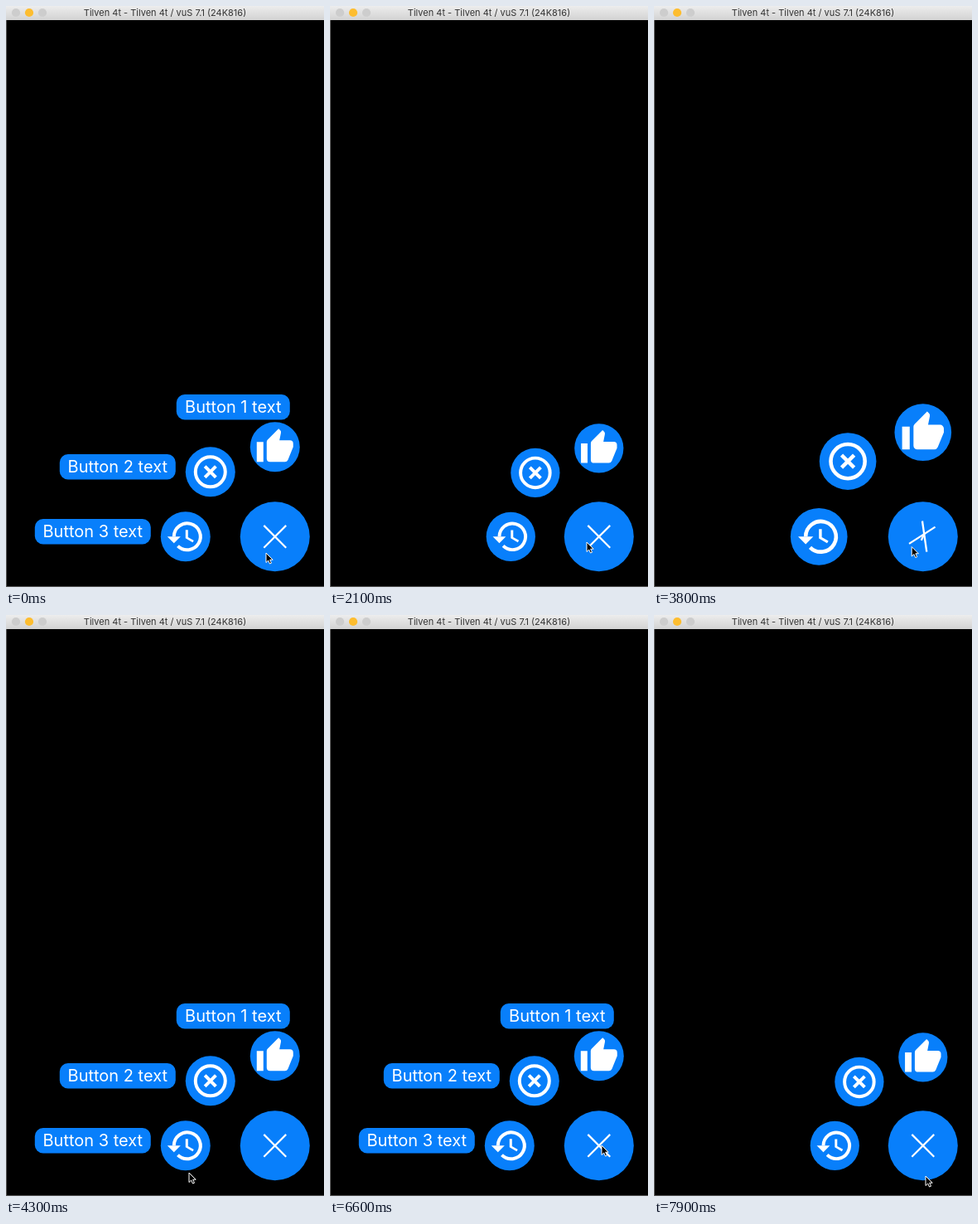
Write an HTML page with a canvas that moves like this. It is 384x700 px and loops after 8 s.

```html
<!DOCTYPE html>
<html lang="en">
<head>
<meta charset="utf-8">
<title>Floating action menu</title>
<style>
  html, body { margin: 0; height: 100%; overflow: hidden; background: #000; }
  canvas { display: block; }
</style>
</head>
<body>
<canvas id="stage" width="384" height="700"></canvas>
<script>
const ctx = document.getElementById('stage').getContext('2d');
const LOOP = 8000, BLUE = '#087ffb', GLIDE = 500;
const MAIN = { x: 324.8, y: 639.3, r: 42 };

// Icons on a 24-unit grid
const thumb = { fill: 'M1 9h4v12H1zM14.2 1l1 1q.6.6.4 1.5L14.7 8H21a2 2 0 0 1 2 2v2l-3.2 7.8A2 2 0 0 1 18 21H9a2 2 0 0 1-2-2V9q0-.8.6-1.4z' };
const cross = { stroke: 'M21 12a9 9 0 1 1-18 0a9 9 0 1 1 18 0M8.7 8.7l6.6 6.6M15.3 8.7l-6.6 6.6' };
const clock = { stroke: 'M5 12a8 8 0 1 1 2.34 5.66', fill: 'M1 12H9L5 16zM12 8v5l4.3 2.5.7-1.2-3.5-2V8z' };
const pointer = new Path2D('M0 0V11.5L2.7 9 4.5 13 6.5 12.2 4.7 8.2H8.2Z');

// Labels end 42 px left of their button unless placed above it
const buttons = [
  { dx: 0, dy: -108, icon: thumb, text: 'Button 1 text', labelRight: 18, labelY: -48, labelWidth: 137 },
  { dx: -78, dy: -78, icon: cross, text: 'Button 2 text' },
  { dx: -108, dy: 0, icon: clock, text: 'Button 3 text' }
];

const opens = [620, 1850, 3650, 5964, 7560];
const closes = [60, 1200, 2730, 5180, 6680];

// Pointer glides: start time and destination
const glides = [
  [0, 314, 659], [1300, 310, 646], [2150, 325, 554], [3050, 318, 650], [3720, 221, 672],
  [4530, 250, 575], [5250, 343, 640], [6050, 328, 639], [7380, 328, 676]
];

const clamp = v => Math.max(0, Math.min(1, v));
const smooth = v => (v = clamp(v), v * v * (3 - 2 * v));
const lastBefore = (times, t) => Math.max(-LOOP, ...times.filter(time => time <= t));

// Overshoots, sinks just under full size, then settles
const spring = t => 1.18 * smooth(t / 130) - .194 * smooth((t - 130) / 115) + .014 * smooth((t - 390) / 60);

function menuState(t) {
  const opened = lastBefore(opens, t), closed = lastBefore(closes, t);
  const opening = opened >= closed;
  const age = t - Math.max(opened, closed);
  if (opening) {
    return { opening, spread: spring(age), turn: smooth(age / 230), labels: clamp((age - 400) / 80) };
  }
  const left = 1 - smooth((age - 100) / 300);
  return { opening, spread: left, turn: left, labels: 1 - clamp(age / 80) };
}

function disc(x, y, r, color) {
  ctx.fillStyle = color;
  ctx.beginPath();
  ctx.arc(x, y, r, 0, 7);
  ctx.fill();
}

function text(string, x, y, size, color) {
  ctx.font = `${size}px Inter, sans-serif`;
  ctx.textAlign = 'center';
  ctx.fillStyle = color;
  ctx.fillText(string, x, y);
}

function drawWindow() {
  ctx.fillStyle = '#000';
  ctx.fillRect(0, 0, 384, 700);
  ctx.fillStyle = '#555';
  ctx.fillRect(0, 17, 1, 683);
  ctx.fillRect(0, 699, 384, 1);
  const bar = ctx.createLinearGradient(0, 0, 0, 17);
  bar.addColorStop(0, '#ededed');
  bar.addColorStop(1, '#d2d2d2');
  ctx.fillStyle = bar;
  ctx.fillRect(0, 0, 384, 17);
  ['#cdcdcd', '#fdbd2f', '#cdcdcd'].forEach((color, i) => disc(12 + 16 * i, 8, 5.1, color));
  text('Tilven 4t - Tilven 4t / vuS 7.1 (24K816)', 192, 12, 11, '#333');
}

function drawButton({ dx, dy, icon }, spread) {
  const scale = (1 + 8 * spread) / 9;
  ctx.save();
  ctx.translate(MAIN.x + dx * spread, MAIN.y + dy * spread);
  ctx.scale(scale, scale);
  disc(0, 0, 30, BLUE);
  ctx.scale(2, 2);
  ctx.translate(-12, -12);
  ctx.fillStyle = ctx.strokeStyle = '#fff';
  ctx.lineWidth = 2;
  if (icon.stroke) ctx.stroke(new Path2D(icon.stroke));
  if (icon.fill) ctx.fill(new Path2D(icon.fill));
  ctx.restore();
}

function drawLabel({ dx, dy, text: caption, labelRight = -42, labelY = -6, labelWidth = 140 }, alpha) {
  const right = MAIN.x + dx + labelRight, y = MAIN.y + dy + labelY;
  ctx.globalAlpha = alpha;
  ctx.fillStyle = BLUE;
  ctx.beginPath();
  ctx.roundRect(right - labelWidth, y - 15.2, labelWidth, 30.4, 10);
  ctx.fill();
  text(caption, right - labelWidth / 2, y + 7, 20, '#fff');
  ctx.globalAlpha = 1;
}

// Bars fan out into a cross when opening; they fold parallel, then level, when closing
function drawMain({ opening, turn }) {
  disc(MAIN.x, MAIN.y, MAIN.r, BLUE);
  ctx.strokeStyle = '#fff';
  ctx.lineWidth = 2.6 - .4 * turn;
  const fold = opening ? turn : clamp(2 * turn - 1);
  const gap = 6.8 * (1 - fold);
  [-1, 0, 1].forEach(row => {
    const lean = opening ? turn : clamp(2 * turn);
    const half = row ? 18 + turn : 18 * (1 - fold);
    ctx.save();
    ctx.translate(MAIN.x, MAIN.y);
    ctx.rotate(-Math.PI / 4 * (lean + fold * (row + 1)));
    ctx.beginPath();
    ctx.moveTo(-half, row * gap);
    ctx.lineTo(half, row * gap);
    ctx.stroke();
    ctx.restore();
  });
}

function drawCursor(t) {
  const i = glides.filter(([start]) => start <= t).length - 1;
  const [start, x, y] = glides[i], [, fromX, fromY] = glides[Math.max(0, i - 1)];
  const u = smooth((t - start) / GLIDE);
  ctx.save();
  ctx.translate(fromX + (x - fromX) * u, fromY + (y - fromY) * u);
  ctx.fillStyle = '#000';
  ctx.strokeStyle = '#fff';
  ctx.lineWidth = 1;
  ctx.fill(pointer);
  ctx.stroke(pointer);
  ctx.restore();
}

function frame(now) {
  const t = now % LOOP, state = menuState(t);
  drawWindow();
  if (state.spread > 0) buttons.forEach(b => drawButton(b, state.spread));
  if (state.labels > 0) buttons.forEach(b => drawLabel(b, state.labels));
  drawMain(state);
  drawCursor(t);
  requestAnimationFrame(frame);
}
requestAnimationFrame(frame);
</script>
</body>
</html>
```
